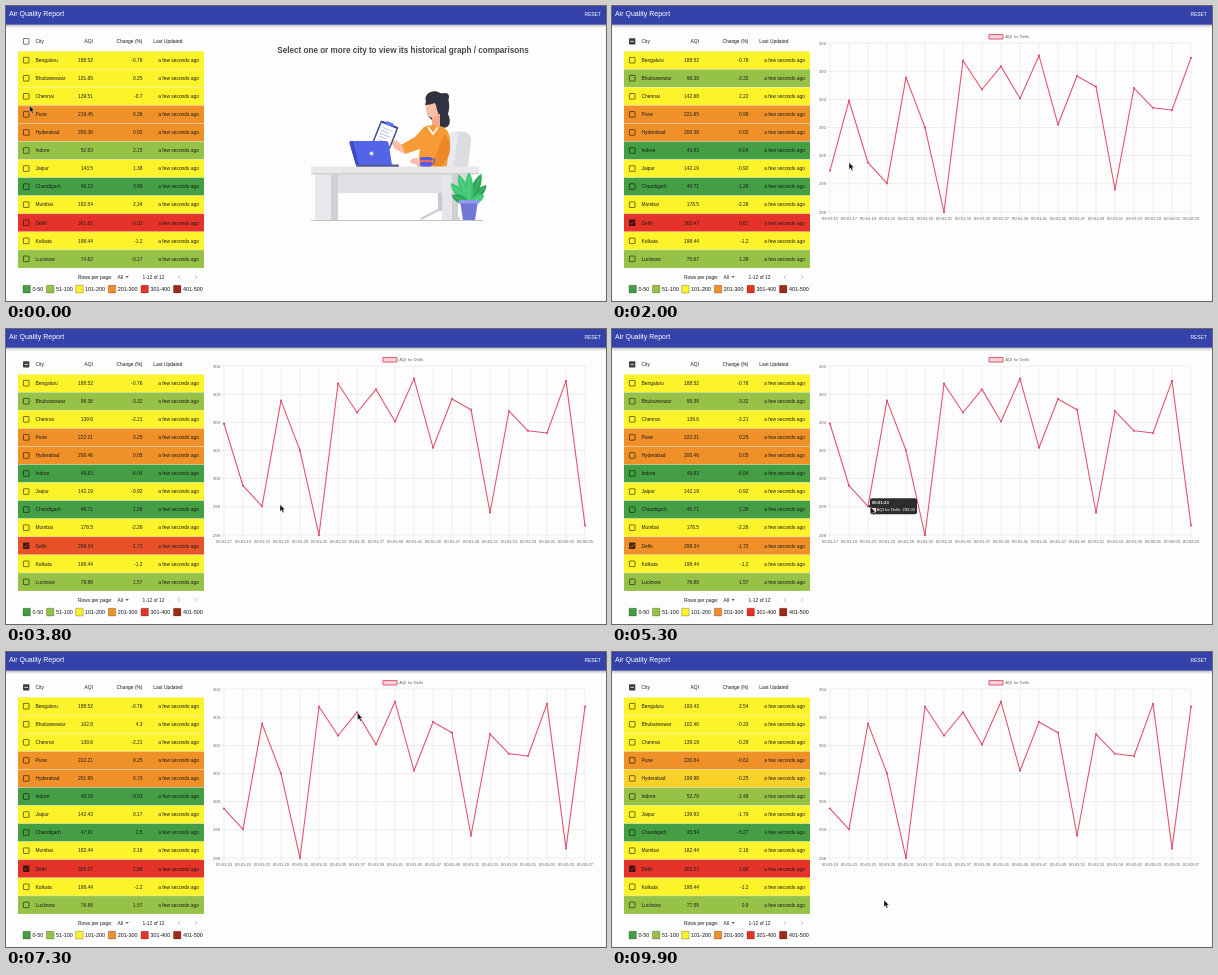
An HTML page with a canvas for the animation above (10000 ms loop, 600x295 px).

```html
<!DOCTYPE html>
<html lang="en">
<head>
<meta charset="utf-8">
<title>Air Quality Report</title>
<style>
html, body { margin: 0; width: 100%; height: 100%; overflow: hidden; background: #fdfdfd; }
canvas { display: block; width: 600px; height: 295px; }
</style>
</head>
<body>
<canvas id="stage"></canvas>
<script>
const W = 600, H = 295, LOOP = 10000, CLICK = 700, FADE = 300;
const FONT = '"Liberation Sans", Arial, sans-serif';
const canvas = document.getElementById('stage');
const ctx = canvas.getContext('2d');
const ratio = window.devicePixelRatio || 1;
canvas.width = W * ratio;
canvas.height = H * ratio;

const BANDS = [
  { max: 50, label: '0-50', x: 17, color: [68, 158, 68] },
  { max: 100, label: '51-100', x: 40.5, color: [150, 194, 71] },
  { max: 200, label: '101-200', x: 69.7, color: [253, 243, 42] },
  { max: 300, label: '201-300', x: 102.3, color: [240, 144, 40] },
  { max: 400, label: '301-400', x: 135, color: [229, 51, 42] },
  { max: 500, label: '401-500', x: 167.5, color: [160, 40, 22] }
];

// Each entry holds the index and its change in percent.
const START = {
  Bengaluru: '188.52 -0.76', Bhubaneswar: '101.65 0.25', Chennai: '139.51 -0.7',
  Pune: '219.45 0.36', Hyderabad: '200.36 0.02', Indore: '52.63 2.15',
  Jaipur: '143.5 1.38', Chandigarh: '46.12 3.65', Mumbai: '182.54 2.34',
  Delhi: '301.62 -0.02', Kolkata: '198.44 -1.2', Lucknow: '74.62 -0.17'
};
const UPDATES = [
  { at: 1700, rows: { Bhubaneswar: '98.38 -3.32', Chennai: '142.68 2.22', Pune: '221.65 0.99',
    Indore: '49.83 -6.04', Jaipur: '142.19 -0.92', Chandigarh: '46.71 1.26',
    Mumbai: '178.5 -2.26', Delhi: '303.47 0.61', Lucknow: '75.67 1.39' } },
  { at: 3700, rows: { Chennai: '139.6 -2.21', Pune: '222.21 0.25', Hyderabad: '200.46 0.05',
    Delhi: '298.34 -1.72', Lucknow: '76.88 1.57' } },
  { at: 5700, rows: { Bhubaneswar: '102.8 4.3', Hyderabad: '201.95 0.73', Indore: '48.16 -3.03',
    Jaipur: '142.43 0.17', Chandigarh: '47.91 2.5', Mumbai: '182.44 2.16', Delhi: '303.27 1.66' } },
  { at: 7700, rows: { Bengaluru: '193.43 2.54', Chennai: '139.19 -0.29', Pune: '220.84 -0.62',
    Hyderabad: '200.49 -0.73', Indore: '53.57 10.1', Jaipur: '139.93 -1.79', Chandigarh: '47.94 0.06' } },
  { at: 9700, rows: { Bhubaneswar: '102.46 -0.33', Hyderabad: '199.98 -0.25', Indore: '52.79 -1.48',
    Chandigarh: '45.54 -5.27', Lucknow: '77.58 0.9' } }
];

const SERIES = [302.4, 299.47, 301.95, 299.75, 299.02, 302.77, 301, 298, 303.37, 302.35, 303.17, 302.03,
  303.55, 301.1, 302.83, 302.45, 298.8, 302.4, 301.7, 301.62, 303.47, 298.34, 303.37];
const SKIPPED = [21, 27, 43, 55, 57];
const STAMPS = [];
for (let s = 13; s <= 67; s += 2) {
  if (!SKIPPED.includes(s)) STAMPS.push(`00:0${1 + Math.floor(s / 60)}:${String(s % 60).padStart(2, '0')}`);
}

const POINTER = [
  [0, 23.5, 99.5], [150, 23.5, 99.5], [600, 20, 214], [850, 20, 214], [2000, 237, 156.5],
  [3800, 274, 175.5], [4600, 258.5, 178], [5700, 258.5, 178], [7100, 351.5, 61],
  [8850, 351, 60], [9500, 272, 248], [LOOP, 272, 248]
];
const TOOLTIPS = [{ from: 4700, to: 5700, point: 2 }, { from: 7800, to: 8900, point: 7 }];

const rgb = c => `rgb(${c.map(Math.round).join(',')})`;
const mix = (a, b, k) => a.map((v, i) => v + (b[i] - v) * k);
const bandColor = aqi => BANDS.find(b => aqi <= b.max).color;

function text(str, x, y, { size = 4.9, color = '#1c1c1c', align = 'left', weight = 400 } = {}) {
  ctx.font = `${weight} ${size}px ${FONT}`;
  ctx.fillStyle = color;
  ctx.textAlign = align;
  ctx.textBaseline = 'alphabetic';
  ctx.fillText(str, x, y + size * 0.36);
}
function rect(x, y, w, h, color) {
  ctx.fillStyle = color;
  ctx.fillRect(x, y, w, h);
}
function path(points, { fill, stroke, width = 1, close = !!fill } = {}) {
  ctx.beginPath();
  points.forEach(([x, y]) => ctx.lineTo(x, y));
  if (close) ctx.closePath();
  paint(fill, stroke, width);
}
function shape(d, fill, stroke, width = 1) {
  const p = new Path2D(d);
  if (fill) { ctx.fillStyle = fill; ctx.fill(p); }
  if (stroke) { ctx.strokeStyle = stroke; ctx.lineWidth = width; ctx.stroke(p); }
}
function ellipse(x, y, rx, ry, fill) {
  ctx.beginPath();
  ctx.ellipse(x, y, rx, ry, 0, 0, Math.PI * 2);
  paint(fill);
}
function round(x, y, w, h, r, fill, stroke, width) {
  ctx.beginPath();
  ctx.roundRect(x, y, w, h, r);
  paint(fill, stroke, width);
}
function paint(fill, stroke, width = 1) {
  if (fill) { ctx.fillStyle = fill; ctx.fill(); }
  if (stroke) { ctx.strokeStyle = stroke; ctx.lineWidth = width; ctx.stroke(); }
}

function drawBar() {
  const shade = ctx.createLinearGradient(0, 18, 0, 22);
  shade.addColorStop(0, 'rgba(0,0,0,.3)');
  shade.addColorStop(1, 'rgba(0,0,0,0)');
  rect(0, 18, W, 4, shade);
  rect(0, 0, W, 18.6, '#3442a9');
  text('Air Quality Report', 3, 7.7, { size: 7, color: '#fff' });
  text('RESET', 578.4, 8, { color: '#fff' });
}

function drawCheckbox(y, state, mark) {
  const x = 20.2;
  if (!state) {
    round(x - 2.8, y - 2.8, 5.6, 5.6, 0.5, null, 'rgba(0,0,0,.68)', 0.8);
    return;
  }
  round(x - 3.15, y - 3.15, 6.3, 6.3, 0.7, 'rgba(20,10,10,.8)');
  const line = state === 'some' ? [[x - 1.8, y], [x + 1.8, y]]
    : [[x - 2.1, y], [x - 0.7, y + 1.5], [x + 2.2, y - 1.5]];
  path(line, { stroke: mark, width: 0.75 });
}

function cityState(name, t) {
  let now = START[name], color = bandColor(parseFloat(now));
  for (const { at, rows } of UPDATES) {
    if (t < at || !rows[name]) continue;
    now = rows[name];
    color = mix(color, bandColor(parseFloat(now)), Math.min(1, (t - at) / FADE));
  }
  const [aqi, change] = now.split(' ');
  return { aqi, change, color: rgb(color) };
}

function drawTable(t) {
  const picked = t >= CLICK;
  const right = { align: 'right' };
  drawCheckbox(35.4, picked && 'some', '#fff');
  text('City', 29.5, 35.7);
  text('AQI', 87, 35.7, right);
  text('Change (%)', 136.5, 35.7, right);
  text('Last Updated', 147.3, 35.7);

  Object.keys(START).forEach((name, i) => {
    const top = 45.2 + i * 18.06, y = top + 9;
    const { aqi, change, color } = cityState(name, t);
    rect(12, top, 186, 18.06, color);
    rect(12, top - 0.2, 186, 0.5, 'rgba(235,235,225,.75)');
    drawCheckbox(y, picked && name === 'Delhi' && 'on', color);
    text(name, 29.5, y);
    text(aqi, 87, y, right);
    text(change, 136.5, y, right);
    text('a few seconds ago', 193, y, right);
  });

  text('Rows per page:', 72, 271);
  text('All', 111.5, 271);
  path([[119.3, 270], [122.9, 270], [121.1, 271.9]], { fill: '#666' });
  text('1-12 of 12', 136.5, 271);
  path([[174, 268.9], [172, 270.9], [174, 272.9]], { stroke: '#b5b5b5', width: 0.8 });
  path([[189, 268.9], [191, 270.9], [189, 272.9]], { stroke: '#b5b5b5', width: 0.8 });

  for (const { label, x, color } of BANDS) {
    round(x, 279.3, 7.4, 7.6, 0.4, rgb(color), 'rgba(30,30,30,.55)', 0.5);
    text(label, x + 9.4, 283.2, { size: 5.4, color: '#111' });
  }
}

function drawLeaf(angle, length, color) {
  ctx.save();
  ctx.translate(463, 197);
  ctx.rotate(angle);
  shape(`M0 0C-6 ${-length * 0.35} -5 ${-length * 0.75} 0 ${-length}C5 ${-length * 0.75} 6 ${-length * 0.35} 0 0Z`, color);
  shape(`M0 0V${-length * 0.85}`, null, 'rgba(255,255,255,.35)', 0.5);
  ctx.restore();
}

function drawWelcome() {
  text('Select one or more city to view its historical graph / comparisons', 397, 44,
    { size: 8.14, weight: 700, color: '#484848', align: 'center' });

  // Chair
  shape('M443 127Q465 122 465 134L460 180Q458 187 447 187H415V180H437Z', '#dcdde1');
  shape('M443 127Q448 126 452 128L445 176Q443 182 437 182H415V178H434Z', '#eaebee');
  rect(432, 187, 4, 18, '#c9cad0');
  path([[415, 213], [432, 204], [437, 204], [454, 213]], { stroke: '#c9cad0', width: 2 });

  // Woman
  shape('M420 96C417 86 429 83 434 87C445 88 444 102 442 108C447 119 441 125 432 120L422 110Z', '#31323f');
  ellipse(439, 91, 4, 4, '#31323f');
  shape('M426 108H434V122L426 121Z', '#f3a78f');
  ellipse(426.5, 103, 6.6, 8.8, '#fabda8');
  shape('M419 99C421 91 428 91 434 95V108C430 106 431 100 429 97Q424 99 419 99Z', '#31323f');
  shape('M418 121Q427 117 437 121Q445 125 444 140L440 164H411L414 143L399 148L395 139L409 131Z', '#f79a38');
  shape('M438 128Q447 137 443 149L435 161L414 160L416 154L429 152Z', '#ee8728');
  shape('M399 148L389 143L385 136L390 134L396 139Z', '#fabda8');
  shape('M417 153L407 152L403 156L414 160Z', '#fabda8');
  path([[422, 121], [427, 128], [432, 121]], { stroke: '#fff', width: 1.6 });

  // Clipboard
  ctx.save();
  ctx.translate(379.5, 128.5);
  ctx.rotate(0.38);
  round(-9.5, -11.5, 19, 24, 1.5, '#3d478f');
  rect(-8, -9.5, 16, 20.5, '#fff');
  round(-4, -13, 8, 3.5, 1, '#6470ee');
  for (let i = 0; i < 5; i++) rect(-5.5, -6 + i * 3.2, i % 2 ? 8 : 11, 0.9, '#b9bfe8');
  ctx.restore();

  // Desk
  rect(309, 168, 16, 46, '#e9e9ec');
  rect(325, 168, 7, 46, '#cfd0d5');
  rect(332, 168, 104, 19, '#dfe0e4');
  rect(436, 168, 10, 46, '#e6e6ea');
  rect(446, 168, 6, 46, '#cfd0d5');
  rect(305, 160.5, 168, 7.8, '#e8e8eb');
  rect(305, 167.2, 168, 1.2, '#cacbd0');
  rect(305, 214, 172, 0.7, '#a8a9b0');

  // Laptop and mug
  shape('M345 135H380Q382 135 382.5 137L386 159H350L343.5 137Q343 135 345 135Z', '#5364e8');
  shape('M345 135H347L353 159H350L343.5 137Z', '#3c4bc2');
  ellipse(365.5, 147.5, 2, 2, '#dfe3ff');
  round(350, 158.5, 43, 2.2, 1, '#525c9c');
  round(414, 151, 12, 9.5, 2, '#4e5de2');
  shape('M425 153H428Q430 158 425 158', null, '#4e5de2', 1.2);
  rect(414, 154, 12, 2.2, '#ef665b');

  // Plant
  [[-0.75, 27], [0.78, 25], [-0.35, 31], [0.4, 32], [0, 31], [-1.15, 19], [1.1, 17]]
    .forEach(([angle, length], i) => drawLeaf(angle, length, i % 2 ? '#2fa65c' : '#42c874'));
  shape('M454 195H472L469 214H457Z', '#7079d5');
  rect(453, 194, 20, 3.5, '#929be9');
}

const plotX = i => 218 + i * 19;
const plotY = v => 37 + (304 - v) * 28.17;

function drawChart(t) {
  const first = t < 1700 ? 0 : t < 3700 ? 1 : t < 5700 ? 2 : 3;
  const values = SERIES.slice(first, first + 20);
  const stamps = STAMPS.slice(first, first + 20);
  const label = { size: 4.2, color: '#666' };
  const grid = 'rgba(0,0,0,.12)', pink = '#e0566f';

  round(377, 28.6, 14, 4.4, 0, '#fbd5dc', pink, 1);
  text('AQI for Delhi', 393.3, 30.9, label);

  for (let v = 298; v <= 304; v++) {
    rect(214.5, plotY(v) - 0.25, 364.5, 0.5, grid);
    text(String(v), 214, plotY(v), { ...label, align: 'right' });
  }
  stamps.forEach((stamp, i) => {
    rect(plotX(i) - 0.25, 37, 0.5, 172.5, grid);
    text(stamp, plotX(i), 212, { ...label, align: 'center' });
  });

  ctx.lineJoin = 'round';
  path(values.map((v, i) => [plotX(i), plotY(v)]), { stroke: pink, width: 1.1 });
  values.forEach((v, i) => ellipse(plotX(i), plotY(v), 1.15, 1.15, pink));

  const tip = TOOLTIPS.find(p => t >= p.from && t < p.to);
  if (tip) drawTooltip(plotX(tip.point), plotY(values[tip.point]), stamps[tip.point], values[tip.point]);
}

function drawTooltip(x, y, stamp, value) {
  const dark = 'rgba(0,0,0,.82)';
  round(x + 2, y - 8, 47, 16, 2, dark);
  path([[x + 0.3, y], [x + 2, y - 1.7], [x + 2, y + 1.7]], { fill: dark });
  text(stamp, x + 4, y - 3.6, { size: 4.2, weight: 700, color: '#fff' });
  rect(x + 4, y + 1.8, 4.1, 4.1, '#fff');
  rect(x + 4.4, y + 2.2, 3.3, 3.3, '#f6cbd3');
  text(`AQI for Delhi: ${value.toFixed(2)}`, x + 8.8, y + 3.7, { size: 4.1, color: '#fff' });
}

function drawPointer(t) {
  const i = POINTER.findIndex(([at]) => at > t);
  const [t0, x0, y0] = POINTER[i - 1], [t1, x1, y1] = POINTER[i];
  const k = (t - t0) / (t1 - t0), ease = k * k * (3 - 2 * k);
  ctx.save();
  ctx.translate(x0 + (x1 - x0) * ease, y0 + (y1 - y0) * ease);
  path([[0, 0], [0, 7], [1.6, 5.6], [2.7, 8.2], [4, 7.6], [2.9, 5.1], [5, 5]],
    { fill: '#111', stroke: 'rgba(255,255,255,.8)', width: 0.5 });
  ctx.restore();
}

function render(now) {
  const t = now % LOOP;
  ctx.setTransform(ratio, 0, 0, ratio, 0, 0);
  rect(0, 0, W, H, '#fdfdfd');
  drawBar();
  drawTable(t);
  if (t < CLICK) drawWelcome();
  else drawChart(t);
  drawPointer(t);
}

const started = performance.now();
function tick() {
  render(performance.now() - started);
  requestAnimationFrame(tick);
}
tick();
</script>
</body>
</html>
```
